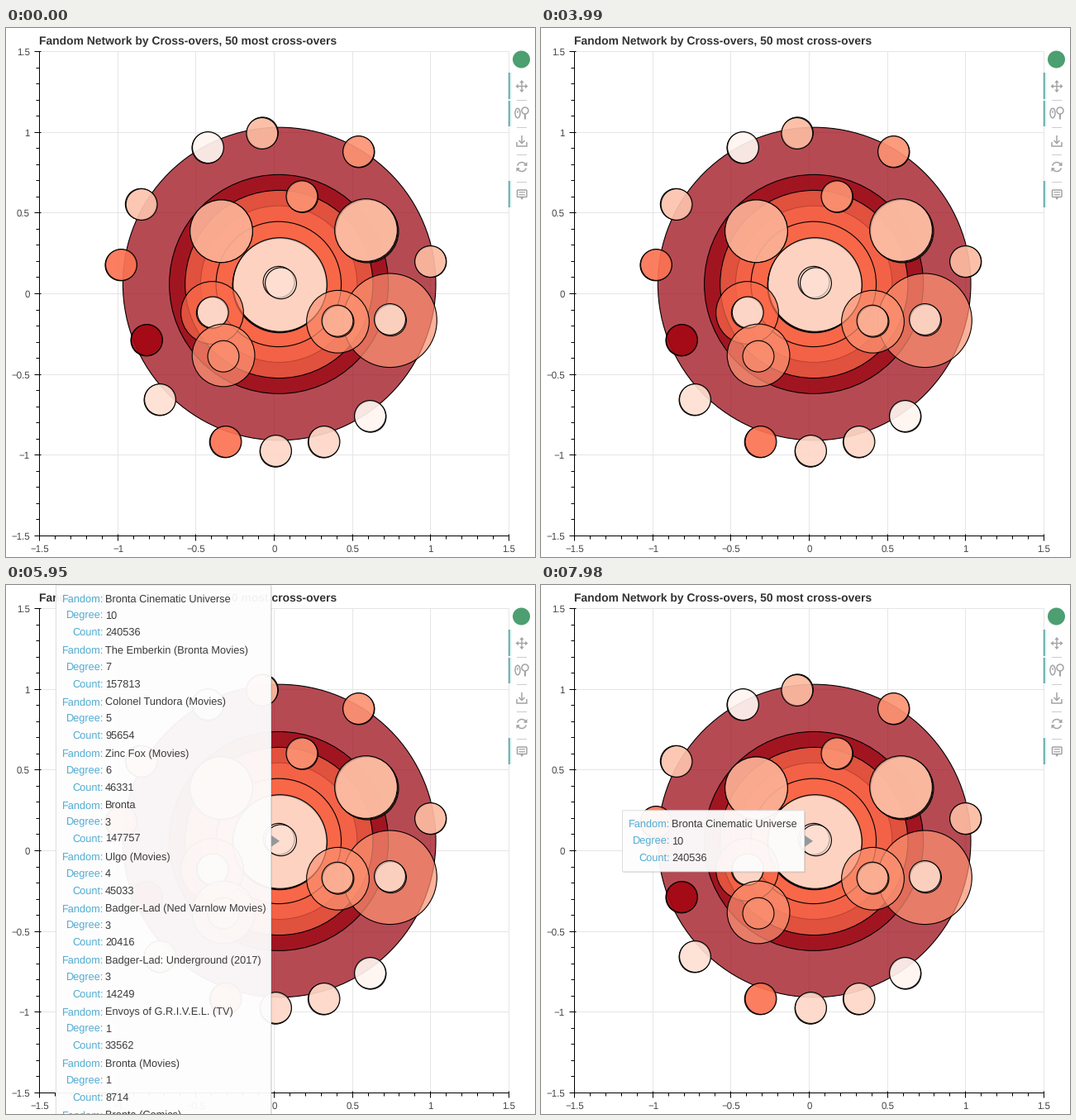
These frames come from a looping animation (640 by 640 pixels, 8 s). A matplotlib script:

```python
import numpy as np
import matplotlib.pyplot as plt
from matplotlib.animation import FuncAnimation
from matplotlib.patches import Arc, Circle, Ellipse, FancyBboxPatch, Polygon, Rectangle

SIZE, DPI = 640, 80
PX = 72 / DPI                      # one pixel in points
LOOP, FRAMES, STEP = 8000, 200, 70
INTERVAL = LOOP // FRAMES

plt.rcParams.update({"font.family": "Liberation Sans", "path.snap": False,
                     "text.hinting": "none"})
fig = plt.figure(figsize=(SIZE / DPI, SIZE / DPI), dpi=DPI, facecolor="white")
ax = fig.add_axes([0, 0, 1, 1])
ax.set_xlim(0, SIZE)
ax.set_ylim(SIZE, 0)
ax.axis("off")


def line(xs, ys, color="black", width=1.0, z=1):
    ax.plot(xs, ys, color=color, lw=width * PX, zorder=z,
            solid_capstyle="butt", solid_joinstyle="miter")


def label(x, y, s, size, color="#444444", ha="left", z=2, **kw):
    return ax.text(x, y, s, fontsize=size * PX, color=color, ha=ha,
                   va="baseline", zorder=z, **kw)


# ---- axes and grid ----
LEFT, RIGHT, TOP, BOTTOM = 40.5, 608.5, 28.5, 614.5


def px(v):
    return LEFT + (v + 1.5) / 3 * (RIGHT - LEFT)


def py(v):
    return BOTTOM - (v + 1.5) / 3 * (BOTTOM - TOP)


def snap(v):
    return np.floor(v) + 0.5


def draw_axes():
    for i in range(31):
        v = -1.5 + i / 10
        x, y = snap(px(v)), snap(py(v))
        if i % 5:
            line([x, x], [BOTTOM, BOTTOM + 4])
            line([LEFT - 4, LEFT], [y, y])
            continue
        line([x, x], [TOP, BOTTOM], "#e5e5e5", z=0)
        line([LEFT, RIGHT], [y, y], "#e5e5e5", z=0)
        line([x, x], [BOTTOM - 2, BOTTOM + 6])
        line([LEFT - 6, LEFT + 2], [y, y])
        name = f"{v:.1f}".removesuffix(".0").replace("-", "\u2212")
        label(x, 634, name, 11.5, ha="center")
        label(29, y + 4.2, name, 11.5, ha="right")
    line([LEFT, LEFT], [TOP, BOTTOM + 0.5])
    line([LEFT, RIGHT], [BOTTOM, BOTTOM])
    label(40, 20, "Fandom Network by Cross-overs, 50 most cross-overs", 13.83,
          "#333333", weight="bold")


# ---- network ----
REDS = ["#fff5f0", "#fee0d2", "#fcbba1", "#fc9272",
        "#fb6a4a", "#ef3b2c", "#cb181d", "#99000d"]
UNIT = 18.93                       # node radius per degree
ALPHA = 0.71


def node(x, y, degree, shades, dx=0.0, dy=0.0):
    """Translucent discs, one per palette digit, the lower ones shifted by (dx, dy)."""
    for i, shade in enumerate(shades):
        below = len(shades) - 1 - i
        center = x + 0.5 + dx * below, y + 0.5 + dy * below
        ax.add_patch(Circle(center, UNIT * degree, fc=(REDS[int(shade)], ALPHA),
                            ec="black", lw=1.1 * PX, zorder=3))


def draw_nodes():
    node(330.2, 309, 10, "7")
    node(329.6, 309.4, 7, "7")
    node(329.8, 309.5, 6, "4")
    ax.add_patch(Circle((330.1, 309.8), UNIT * 5, fc=(REDS[4], ALPHA),
                        ec="#b8402f", lw=0.9 * PX, zorder=3))
    node(329.3, 309.4, 4, "4")
    node(331, 310, 3, "221", -0.3, 0.7)

    node(260, 245.3, 2, "32")
    node(435, 244, 2, "222", 0.8, 0.8)
    node(357.4, 203.2, 1, "33", 0.7, 0.7)
    node(249, 344, 2, "4")
    node(249.8, 343.5, 1, "11", -1, 0.6)
    node(262.6, 395.5, 2, "3")
    node(262.5, 396.7, 1, "3")
    node(464, 353.3, 3, "3")
    node(401, 354.8, 2, "3")
    node(400.5, 353.7, 1, "32", 1, 1)
    node(464, 352, 1, "21", 1, 1.2)
    node(329.6, 306.8, 1, "1")
    node(332, 308.3, 1, "1")

    rim = [(244, 144, "00", -0.6, 0.5), (309.3, 127, "22", 0.6, -0.7),
           (426, 149, "33", 0.5, 0.5), (163.6, 213, "12", -0.8, -0.3),
           (139, 286, "34", -0.6, 0.4), (513, 282, "22", 0.4, 0.3),
           (170, 377, "67", -0.6, 0.4), (186, 449, "11", -0.5, 0.5),
           (265.5, 500, "34", -0.8, 0.4), (326, 511, "21", -0.4, 0.8),
           (384.5, 500, "21", -0.6, 0.6), (440, 469, "00", 0.5, 0.7)]
    for x, y, shades, dx, dy in rim:
        node(x, y, 1, shades, dx, dy)


# ---- toolbar ----
GREY = "#a3a3a3"


def draw_toolbar():
    ax.add_patch(Circle((623.5, 38), 10.5, fc="#4c9f70", ec="none", zorder=2))
    for y in (87.5, 120.5, 153.5, 186.5):
        line([618, 630], [y, y], "#cccccc")
    for y0, y1 in ((54, 86), (88, 119), (185, 217)):
        line([610, 610], [y0, y1], "#d4f3f3", 3)
        line([608.7, 608.7], [y0, y1], "#5a9c9c", 1.6)

    cx, cy = 624, 70.5                              # pan
    line([cx - 6, cx + 6], [cy, cy], GREY, 1.4)
    line([cx, cx], [cy - 6, cy + 6], GREY, 1.4)
    for dx, dy in ((1, 0), (-1, 0), (0, 1), (0, -1)):
        tip, base = np.array([cx + 7.5 * dx, cy + 7.5 * dy]), np.array([dx, dy]) * 3.3
        side = np.array([-dy, dx]) * 2.8
        ax.add_patch(Polygon([tip, tip - base + side, tip - base - side],
                             fc=GREY, ec="none", zorder=2))

    def stroke(patch):
        patch.set(fill=False, ec=GREY, lw=1.5 * PX, zorder=2)
        ax.add_patch(patch)

    stroke(Ellipse((619, 103), 6, 11.5))            # wheel zoom
    line([619, 619], [100, 103], GREY, 1.3)
    stroke(Circle((628, 100), 4))
    line([628, 628], [104, 110.5], GREY, 2)

    line([624, 624], [130, 139], GREY, 1.5)         # save
    line([620.5, 624, 627.5], [136, 139.5, 136], GREY, 1.5)
    line([618, 618, 630, 630], [138, 143, 143, 138], GREY, 1.5)

    stroke(Arc((624, 168), 11, 11, theta1=195, theta2=340))   # reset
    stroke(Arc((624, 168), 11, 11, theta1=15, theta2=160))
    for s in (1, -1):
        ax.add_patch(Polygon([(624 + s * 6.5, 168 - s * 6), (624 + s * 6.5, 168 - s * 1),
                              (624 + s * 2, 168 - s * 1.5)], fc=GREY, ec="none", zorder=2))

    stroke(FancyBboxPatch((618.5, 196), 11.5, 8.5, boxstyle="round,pad=0,rounding_size=1"))
    for y in (198.7, 201.7):                        # hover
        line([620.5, 628], [y, y], GREY, 1.2)
    ax.add_patch(Polygon([(622, 204.5), (626.5, 204.5), (624, 208)], fc=GREY,
                         ec="none", zorder=2))


# ---- tooltip ----
ITEMS = [("Bronta Cinematic Universe", 10, 240536),
         ("The Emberkin (Bronta Movies)", 7, 157813),
         ("Colonel Tundora (Movies)", 5, 95654),
         ("Zinc Fox (Movies)", 6, 46331),
         ("Bronta", 3, 147757),
         ("Ulgo (Movies)", 4, 45033),
         ("Badger-Lad (Ned Varnlow Movies)", 3, 20416),
         ("Badger-Lad: Underground (2017)", 3, 14249),
         ("Envoys of G.R.I.V.E.L. (TV)", 1, 33562),
         ("Bronta (Movies)", 1, 8714),
         ("Bronta (Comics)", 1, 7260)]
PITCH, ROW = 62.5, 20.25
MID = 309.8

box = ax.add_patch(Rectangle((0, 0), 1, 1, fc=("white", 0.95), ec="#dcdcdc",
                             lw=PX, zorder=10))
shadow = ax.add_patch(Rectangle((0, 0), 1, 1, fc=("black", 0.1), ec="none", zorder=9))
arrow = ax.add_patch(Polygon([(0, 0), (1, 0), (0, 1)], fc="#909599", ec="none",
                             alpha=0.95, zorder=11))


def make_rows(item):
    rows = []
    for key, value in zip(("Fandom:", "Degree:", "Count:"), item):
        rows.append((label(0, 0, key, 12.7, "#52acd2", "right", 12),
                     label(0, 0, str(value), 12.8, "#3a3a3a", "left", 12)))
    return rows


ROWS = [make_rows(item) for item in ITEMS]


def pointer_radius(t):
    """Distance of the pointer from the centre of the nested nodes."""
    if t < 4970:
        return 400
    return np.interp(t, [4970, 5530, 5810, 5880, 7070, 7420, 7490, 7700, 7770],
                     [180, 70, 20, 8, 10, 105, 120, 131, 140])


def update(i):
    t = (i * INTERVAL + INTERVAL // 2) // STEP * STEP
    r = pointer_radius(t)
    hits = [r < UNIT * degree for _, degree, _ in ITEMS]
    n = sum(hits)
    for part in (box, shadow, arrow):
        part.set_visible(n > 0)

    right = 319 if n < 4 else 318 if n < 6 else 319 if n < 9 else 321
    width = 221 if n < 2 else 242 if n < 6 else 261
    height = 74 + PITCH * (n - 1)
    left, top = right - width, max(0, MID - height / 2)
    box.set_bounds(left + 0.5, top, width - 1, height)
    shadow.set_bounds(left + 1.5, top + 1.5, width - 0.5, height)
    arrow.set_xy([(right, MID - 7), (right + 10, MID), (right, MID + 7)])

    y = top + 20.4
    for hit, rows in zip(hits, ROWS):
        for j, (key, value) in enumerate(rows):
            key.set_visible(hit)
            value.set_visible(hit)
            key.set_position((left + 58.3, y + j * ROW))
            value.set_position((left + 60, y + j * ROW))
        y += PITCH * hit
    return []


draw_axes()
draw_nodes()
draw_toolbar()
anim = FuncAnimation(fig, update, frames=FRAMES, interval=INTERVAL, repeat=True,
                     repeat_delay=0, blit=False)
plt.show()
```
